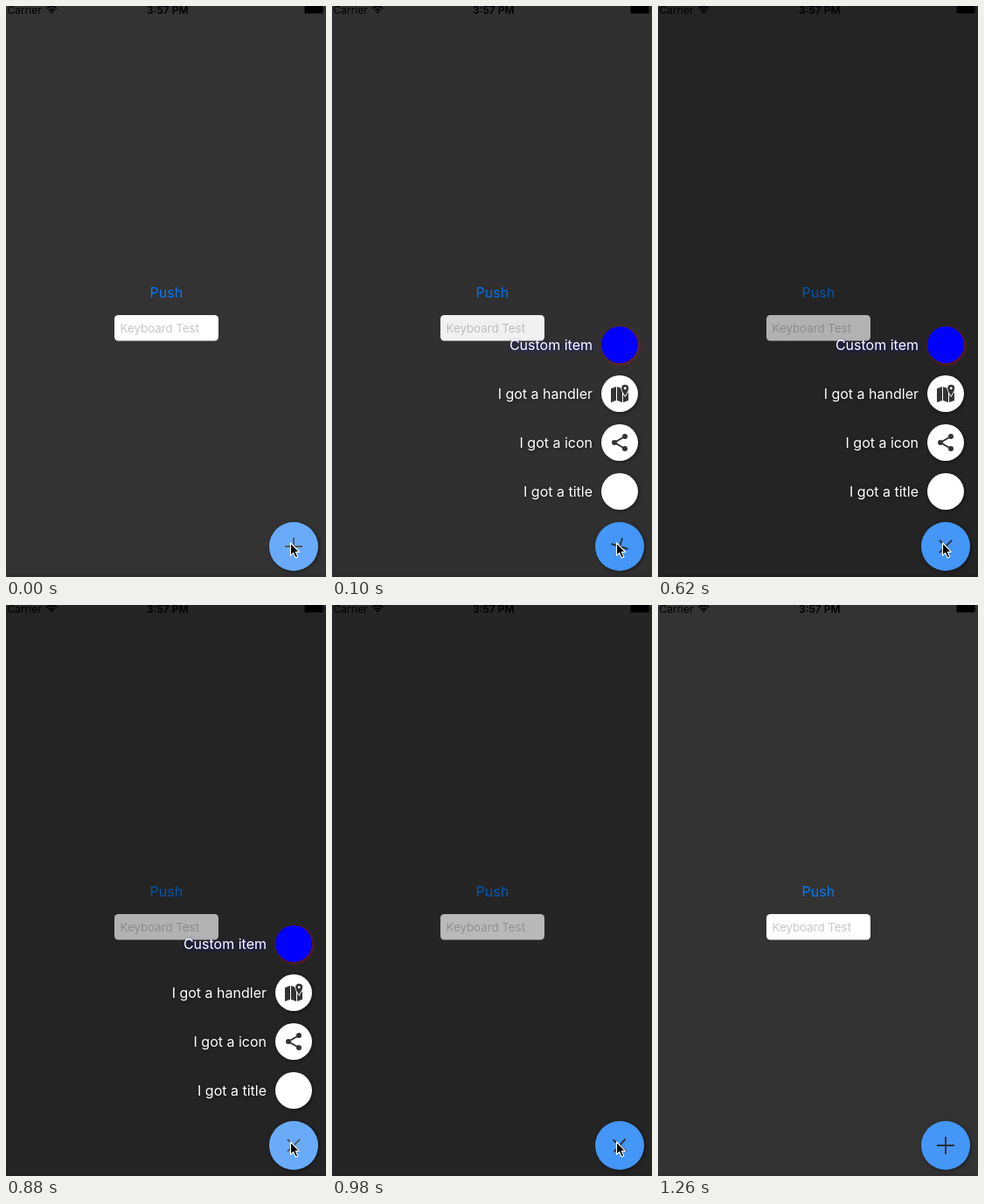
Recreate the animation shown at these times as an HTML page. Size 366 px wide and 654 px high, loop 1.64 s.

```html
<!DOCTYPE html>
<html lang="en">
<head>
<meta charset="utf-8">
<title>Floating action button</title>
<style>
  html, body { margin: 0; width: 100%; height: 100%; overflow: hidden; background: #333; }
  svg { display: block; width: 366px; height: 654px; font-family: Inter, Roboto, sans-serif; }

  .dim, .items, .tint, .plus, .cursor { animation: 1640ms linear infinite; }
  .dim { animation-name: dim; }
  .items { animation-name: items; animation-timing-function: step-end; }
  .tint { animation-name: tint; animation-timing-function: step-end; }
  .plus { animation-name: turn; transform-origin: 329px 619px; }
  .cursor { animation-name: leave; }

  .items text { font-size: 16px; fill: #fff; text-anchor: end; }
  .shade { filter: drop-shadow(1px 1px 2px rgba(0, 0, 0, .5)); }
  .shade-red { filter: drop-shadow(1px 1px 2px rgba(255, 0, 0, .45)); }
  .shade-blue { filter: drop-shadow(1px 1px 2px rgba(0, 0, 255, .5)); }

  @keyframes dim {
    0%, 3.66% { opacity: 0; animation-timing-function: ease-in-out; }
    12.2%, 58.54% { opacity: .3; animation-timing-function: ease-in-out; }
    64.63%, 100% { opacity: 0; }
  }
  @keyframes items {
    0% { opacity: 0; }
    1.22% { opacity: 1; }
    57.32%, 100% { opacity: 0; }
  }
  @keyframes tint {
    0% { opacity: .2; }
    1.22% { opacity: 0; }
    53.66% { opacity: .2; }
    57.32%, 100% { opacity: 0; }
  }
  /* springs past 45 degrees when opening */
  @keyframes turn {
    0%, 3.66% { transform: rotate(0deg); animation-timing-function: ease-in-out; }
    9.76% { transform: rotate(50deg); animation-timing-function: ease-in-out; }
    12.2% { transform: rotate(44deg); }
    14.63%, 58.54% { transform: rotate(45deg); animation-timing-function: ease-in-out; }
    64.63%, 100% { transform: rotate(0deg); }
  }
  @keyframes leave {
    0%, 65.24% { transform: translate(0, 0); visibility: visible; animation-timing-function: ease-in-out; }
    76.82% { transform: translate(-40px, -640px); visibility: visible; }
    76.83%, 100% { transform: translate(-40px, -640px); visibility: hidden; }
  }
</style>
</head>
<body>
<svg viewBox="0 0 366 654">
  <rect width="366" height="654" fill="#333"/>
  <rect y="650" width="366" height="4" fill="#000" opacity=".08"/>

  <text x="164.5" y="333.5" font-size="16" fill="#007aff">Push</text>
  <rect x="124" y="354" width="119" height="29.5" rx="4.5" fill="#fff"/>
  <text x="130.5" y="373.6" font-size="13.3" fill="#c7c7cd">Keyboard Test</text>

  <rect class="dim" width="366" height="654"/>

  <g class="status">
    <text x="1.5" y="9" font-size="12">Carrier</text>
    <g fill="none" stroke="#000" stroke-width="1.6">
      <path d="M46.5 2.8Q52.3 -1.8 58.1 2.8M48.7 5.1Q52.3 2.2 55.9 5.1"/>
    </g>
    <path d="M50.2 6.4Q52.3 4.8 54.4 6.4L52.3 8.6Z"/>
    <text x="161" y="9" font-size="12" font-weight="600">3:57 PM</text>
    <rect x="341.5" y="0" width="21" height="8.5" rx=".8"/>
    <path d="M363.5 2.5q1.8 1.8 0 3.6z"/>
  </g>

  <g class="items">
    <circle class="shade-red" cx="329" cy="388" r="21" fill="#00f"/>
    <text class="shade-blue" x="298" y="393.7">Custom item</text>

    <circle class="shade" cx="329" cy="444" r="21" fill="#fff"/>
    <text class="shade" x="298" y="449.7">I got a handler</text>
    <g fill="#333">
      <path d="M319 438.2L325 436V451.8L319 454ZM326 436L332 438.2V454L326 451.8ZM333 443.5L339 443V451.8L333 454Z"/>
      <path d="M335.2 446.5C333.4 443.4 331.2 440.8 331.2 437.8A4 4 0 0 1 339.2 437.8C339.2 440.8 337 443.4 335.2 446.5Z" stroke="#fff" stroke-width="1.6" paint-order="stroke"/>
      <circle cx="335.2" cy="437.7" r="1.5" fill="#fff"/>
    </g>

    <circle class="shade" cx="329" cy="500" r="21" fill="#fff"/>
    <text class="shade" x="298" y="505.7">I got a icon</text>
    <g fill="#333">
      <path d="M335 493L323 500L335 507" fill="none" stroke="#333" stroke-width="2"/>
      <circle cx="335" cy="493" r="3"/>
      <circle cx="323" cy="500" r="3"/>
      <circle cx="335" cy="507" r="3"/>
    </g>

    <circle class="shade" cx="329" cy="556" r="21" fill="#fff"/>
    <text class="shade" x="298" y="561.7">I got a title</text>
  </g>

  <circle class="shade" cx="329" cy="619" r="28" fill="#4496f7"/>
  <path class="plus" d="M319 619H339M329 609V629" stroke="#2a2d33" stroke-width="1.9"/>
  <circle class="tint" cx="329" cy="619" r="28" fill="#fff"/>

  <path class="cursor" d="M325.5 615V629.4L328.7 626.4L331.2 632L333.7 630.9L331.3 625.4H335.6Z"
        stroke="#fff" stroke-width="1.1" stroke-linejoin="round"/>
</svg>
</body>
</html>
```
